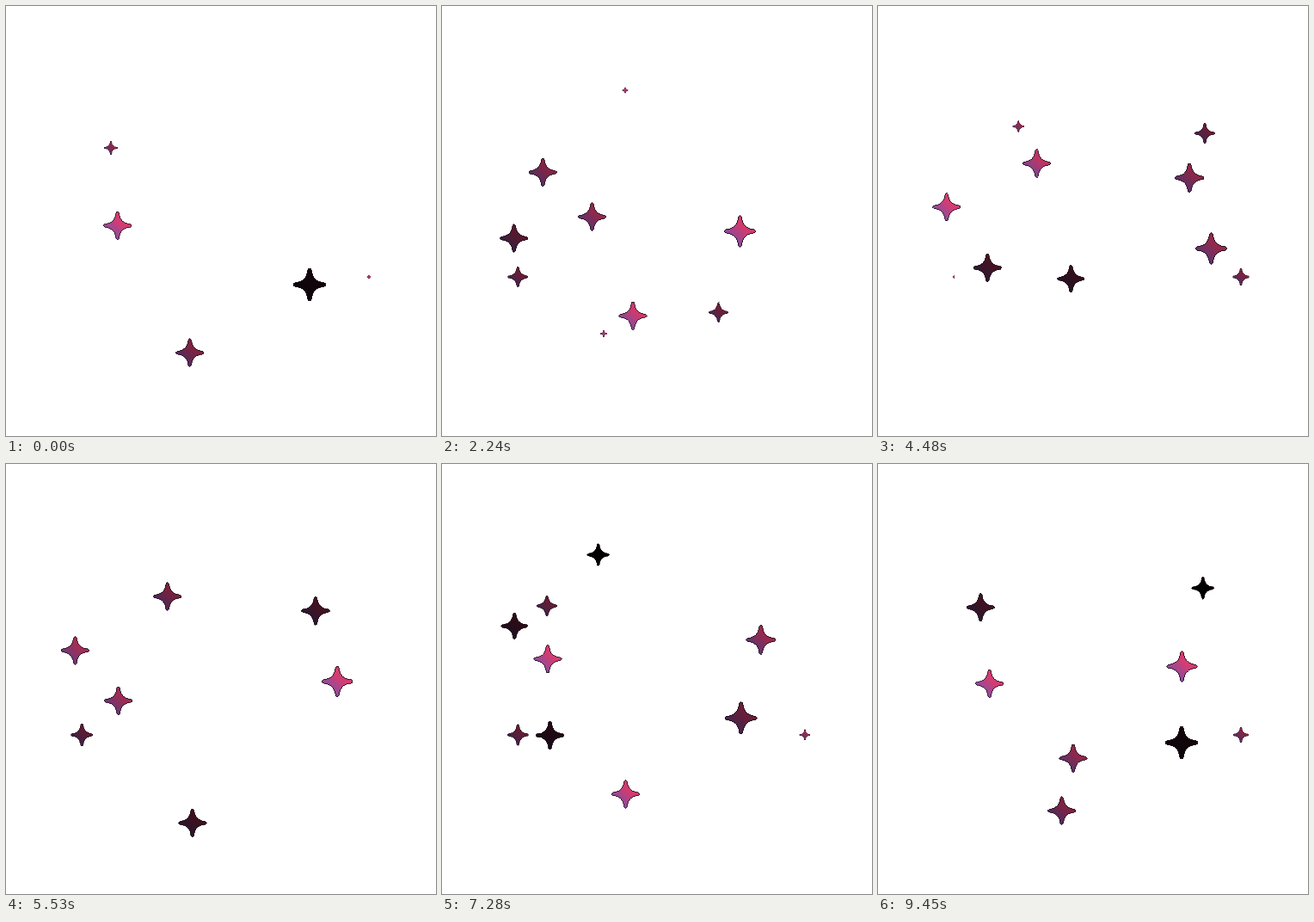
An HTML page that plays this animation: 500x500 px, repeating every 9.52 s.

```html
<!DOCTYPE html>
<html lang="en">
<head>
<meta charset="utf-8">
<title>Sparkles</title>
<style>
html, body { margin: 0; width: 100%; height: 100%; overflow: hidden; background: #fff; }
svg { display: block; width: 100%; height: 100%; }
path { shape-rendering: crispEdges; }
.body { fill: url(#glow); }
.shade { stroke: #1c0c18; stroke-width: .8; }
</style>
</head>
<body>
<svg viewBox="0 0 500 500">
  <defs>
    <linearGradient id="glow" gradientUnits="userSpaceOnUse" x1="-9" y1="10" x2="3" y2="-3">
      <stop offset="0" stop-color="#824fa4"/>
      <stop offset="1" stop-color="#d43c72"/>
    </linearGradient>
  </defs>
  <g id="sky"></g>
</svg>
<script>
const LOOP = 9520, STEP = 70, LIFE = 6900, POP = 1330, RADIUS = 16.5;
const NS = "http://www.w3.org/2000/svg";
const sky = document.getElementById("sky");
const clamp = v => Math.max(0, Math.min(1, v));

// Four rounded tips joined by concave sides.
function starPath() {
  const turn = (x, y, k) => [[x, y], [-y, x], [-x, -y], [y, -x]][k].join(",");
  let d = "M" + turn(-1.6, -15.2, 0);
  for (let k = 0; k < 4; k++) {
    const p = (x, y) => turn(x, y, k);
    d += `Q${p(0, -17.5)} ${p(1.6, -15.2)}C${p(2.8, -6.3)} ${p(6.3, -2.8)} ${p(15.2, -1.6)}`;
  }
  return d + "Z";
}
const shape = starPath();

// Rising stars: start point, speed in px/ms, sway, waves per life, first and last radius, births.
const drifters = [
  { x: 124, y: 326.3, v: .0277, sway: 6.5, waves: 1, r: [16.5, 16.5], born: [-2560, 3690, 6890] },
  { x: 87, y: 286.6, v: .0162, sway: -7.2, waves: .5, r: [16.5, 16.5], born: [1220] },
  { x: 181, y: 292, v: .0277, sway: -6.5, waves: 1, r: [16.5, 16.5], born: [550] },
  { x: 220, y: 431, v: .0192, sway: -7, waves: 1, r: [16.5, 16.5], born: [-1450, 4820, 8000] },
  { x: 354, y: 329.5, v: .0277, sway: -8, waves: 1, r: [19.5, 16.2], born: [-200, 6050, 9250] },
  { x: 379, y: 329.5, v: .0277, sway: 8.5, waves: 1, r: [19.5, 16.2], born: [2765] }
];

// Fixed sparkles that grow and then vanish: x, y, births.
const sparkles = [
  [122, 165, [-760, 6100, 7950]],
  [422, 315, [-280, 3540, 6670, 8590]],
  [88.3, 315, [1097, 4290, 6100]],
  [355, 198, [5630, 7380]],
  [213, 98, [1860]],
  [188, 381, [1840]],
  [321.5, 356.3, [1145]],
  [380, 148, [3340]],
  [305, 123, [2340]],
  [163.3, 140, [3810]]
];

function makeStar() {
  const g = document.createElementNS(NS, "g");
  const [body, shade] = ["body", "shade"].map(name => {
    const p = document.createElementNS(NS, "path");
    p.setAttribute("class", name);
    p.setAttribute("d", shape);
    return g.appendChild(p);
  });
  sky.appendChild(g);
  return { g, body, shade };
}

function place(star, x, y, r, light) {
  star.g.setAttribute("transform", `translate(${x.toFixed(2)} ${y.toFixed(2)}) scale(${(r / RADIUS).toFixed(4)})`);
  star.shade.setAttribute("fill-opacity", (1 - light).toFixed(3));
}

// A full wave swings faster through the middle than at its ends.
function swing(p, waves) {
  const u = 2 * Math.PI * waves * p;
  return waves === 1 ? Math.sin(u) - .15 * Math.sin(2 * u) : Math.sin(u);
}

function drift(star, d, age) {
  const p = age / LIFE;
  const x = d.x + d.sway * swing(p, d.waves);
  const shrink = 1 - .23 * Math.max(0, (age - 5800) / 1030);
  const r = (d.r[0] + (d.r[1] - d.r[0]) * p) * shrink;
  const light = Math.min(clamp(age / 2500), clamp((6680 - age) / 3100));
  place(star, x, d.y - d.v * age, r, light);
}

function sparkle(star, [x, y], age) {
  const p = age / POP;
  place(star, x, y, 14 * p, 1 - .6 * p);
}

const actors = [];
function cast(item, births, life, draw) {
  births.forEach(born => actors.push({ star: makeStar(), item, born, life, draw }));
}
drifters.forEach(d => cast(d, d.born, LIFE, drift));
sparkles.forEach(s => cast(s, s[2], POP, sparkle));

function render(t) {
  for (const a of actors) {
    const age = t - a.born;
    const alive = age > 0 && age < a.life;
    a.star.g.style.display = alive ? "" : "none";
    if (alive) a.draw(a.star, a.item, age);
  }
}

const start = performance.now();
function tick() {
  const t = (performance.now() - start) % LOOP;
  render(Math.floor(t / STEP) * STEP);
  requestAnimationFrame(tick);
}
tick();
</script>
</body>
</html>
```
